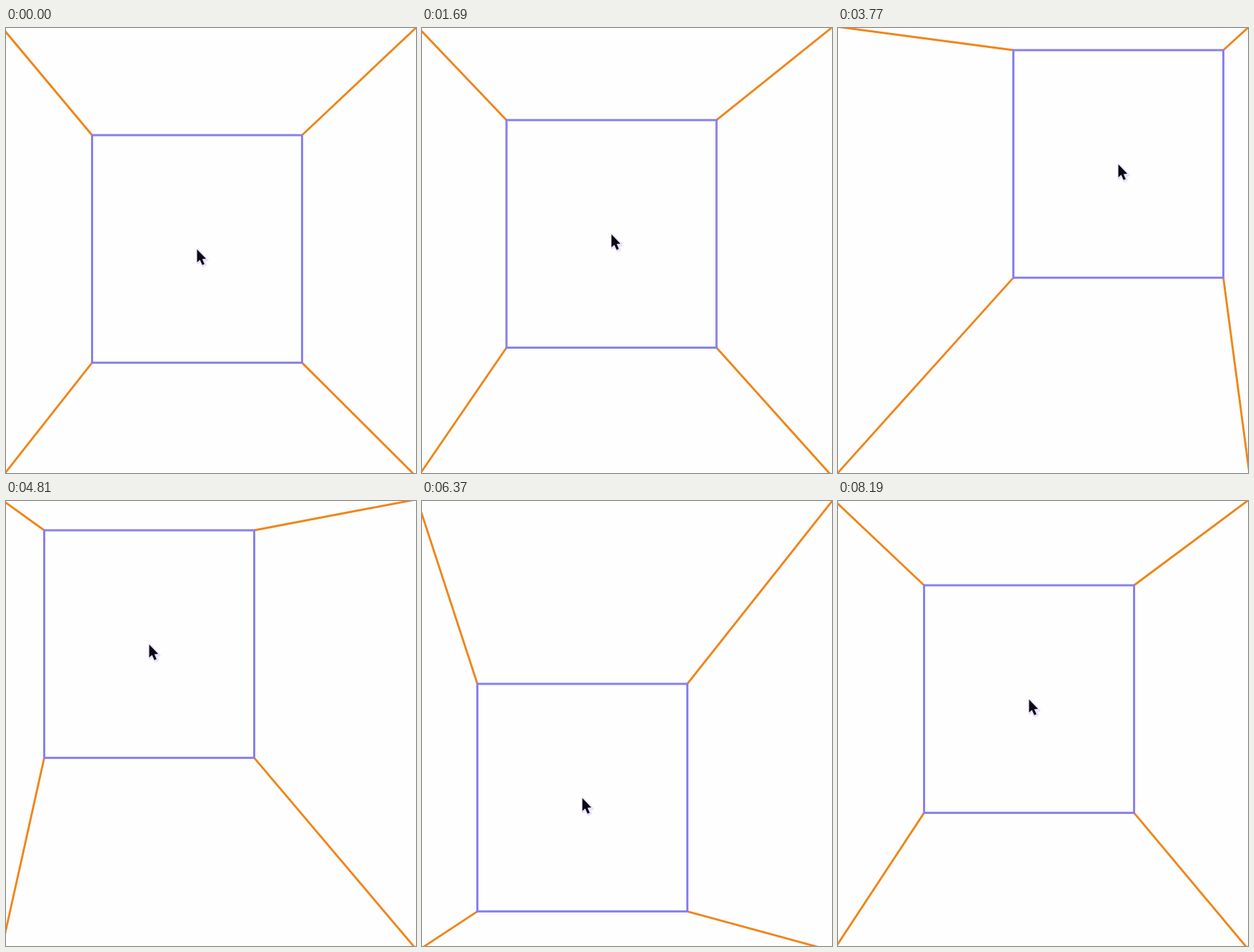
Recreate the animation shown at these times as an HTML page. Size 574 by 623 pixels, loop 8320 ms.

```html
<!DOCTYPE html>
<html lang="en">
<head>
<meta charset="utf-8">
<title>Tethered box</title>
<style>
  html, body { margin: 0; width: 100%; height: 100%; overflow: hidden; background: #fefefe; }
  svg { display: block; width: 574px; height: 623px; }
  line { stroke: #ef8519; stroke-width: 2.9; }
  rect { fill: none; stroke: #8980ec; stroke-width: 3; }
  .glow { fill: #e3dbfc; stroke: #e3dbfc; stroke-width: 4; stroke-linejoin: round; opacity: .75; }
  .arrow { fill: #0c0712; }
</style>
</head>
<body>
<svg viewBox="0 0 574 623">
  <line/><line/><line/><line/>
  <g id="box">
    <rect width="294" height="318.6"/>
    <g transform="translate(147 160)">
      <path class="glow" transform="translate(1 1)" d="M0 0V18L4 15L7.5 22L10.5 20.500L7.500 14H13Z"/>
      <path class="arrow" d="M0 0V18L4 14.500L7.300 21.800L10.300 20.400L7.200 13.400L12.500 13Z"/>
    </g>
  </g>
</svg>
<script>
const LOOP = 8320, STEP = 130, W = 294, H = 318.6;

// time, left, top of the box
const path = [
  [0, 120.5, 150],
  [910, 138.5, 40],
  [2600, 92.8, 241],
  [3770, 245.5, 31],
  [4810, 53.5, 41],
  [6370, 77.5, 256],
  [8190, 120.5, 118]
];

// fixed end of each tether, and the box corner it meets
const tethers = [
  [-7, -2.5, 0, 0],
  [576.2, -2.5, W, 0],
  [-6.7, 630, 0, H],
  [576.8, 630.5, W, H]
];

const box = document.getElementById('box');
const lines = document.querySelectorAll('line');

const slope = (i, axis) =>
  (path[i + 1][axis] - path[i][axis]) / (path[i + 1][0] - path[i][0]);

// smooth speed at a point, resting where the direction turns
function tangent(i, axis) {
  if (i === 0) return slope(0, axis);
  if (i === path.length - 1) return slope(i - 1, axis);
  const a = slope(i - 1, axis), b = slope(i, axis);
  return a * b <= 0 ? 0 : 2 * a * b / (a + b);
}

function position(t, axis) {
  let i = 0;
  while (i < path.length - 2 && t >= path[i + 1][0]) i++;
  const span = path[i + 1][0] - path[i][0];
  const u = (t - path[i][0]) / span, v = 1 - u;
  return path[i][axis] * (1 + 2 * u) * v * v
    + tangent(i, axis) * span * u * v * v
    + path[i + 1][axis] * u * u * (3 - 2 * u)
    - tangent(i + 1, axis) * span * u * u * v;
}

function draw(time) {
  const t = Math.floor((time % LOOP) / STEP) * STEP;
  const x = position(t, 1), y = position(t, 2);
  box.setAttribute('transform', `translate(${x} ${y})`);
  tethers.forEach(([ax, ay, cx, cy], i) => {
    const ends = { x1: ax, y1: ay, x2: x + cx, y2: y + cy };
    for (const key in ends) lines[i].setAttribute(key, ends[key]);
  });
}

const start = performance.now();
function tick() {
  draw(performance.now() - start);
  requestAnimationFrame(tick);
}
tick();
</script>
</body>
</html>
```
